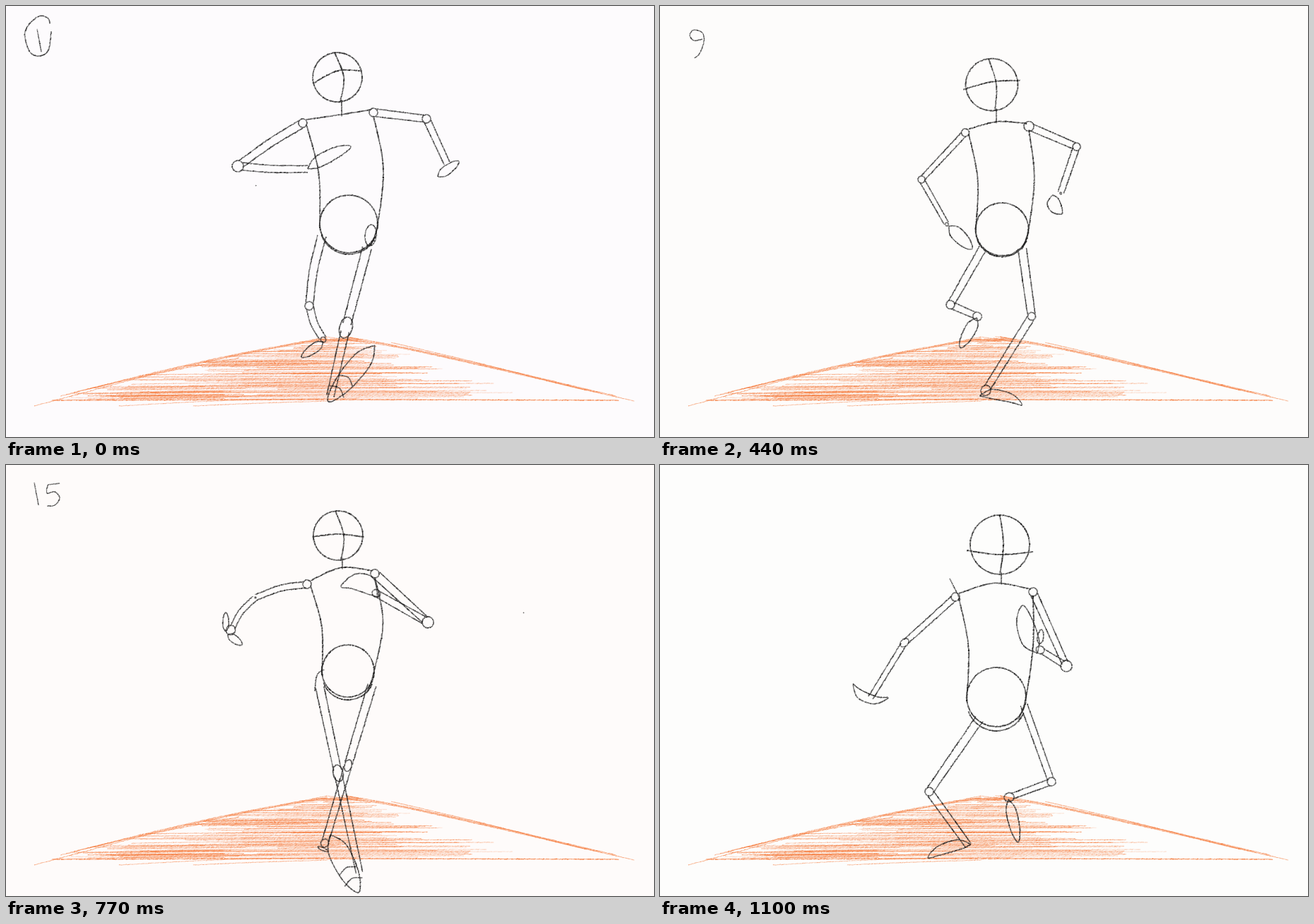
Write an HTML page with a canvas that moves like this. It is 917 by 611 pixels and loops after 1.21 s.

```html
<!DOCTYPE html>
<html lang="en">
<head>
<meta charset="utf-8">
<title>Pencil run cycle</title>
<style>
html, body { margin: 0; width: 100%; height: 100%; overflow: hidden; background: #fdfcfc; }
canvas { display: block; }
</style>
</head>
<body>
<canvas id="stage" width="917" height="611"></canvas>
<script>
const STEP = 110, W = 917, H = 611, SAMPLES = 40;
const ctx = document.getElementById('stage').getContext('2d');
const mix = (a, b, k) => a + (b - a) * k;

function seeded(seed) {
  return () => {
    seed = (seed + 0x6d2b79f5) | 0;
    let t = Math.imul(seed ^ (seed >>> 15), 1 | seed);
    t = (t + Math.imul(t ^ (t >>> 7), 61 | t)) ^ t;
    return ((t ^ (t >>> 14)) >>> 0) / 4294967296;
  };
}

// ---- curves ----

function arc(x, y, rx, ry = rx, turn = 0, from = 0, to = Math.PI * 2) {
  return Array.from({ length: SAMPLES + 1 }, (_, i) => {
    const a = mix(from, to, i / SAMPLES), u = Math.cos(a) * rx, v = Math.sin(a) * ry;
    return [x + u * Math.cos(turn) - v * Math.sin(turn), y + u * Math.sin(turn) + v * Math.cos(turn)];
  });
}

// Smooth line through x, y pairs.
function curve(...flat) {
  const n = flat.length / 2;
  const at = (i, axis) => flat[Math.min(n - 1, Math.max(0, i)) * 2 + axis];
  const spline = (i, f, axis) => {
    const [a, b, c, d] = [i - 1, i, i + 1, i + 2].map(j => at(j, axis));
    return b + f / 2 * (c - a + f * (2 * a - 5 * b + 4 * c - d + f * (3 * (b - c) + d - a)));
  };
  return Array.from({ length: SAMPLES + 1 }, (_, s) => {
    const u = s / SAMPLES * (n - 1), i = Math.min(n - 2, Math.floor(u));
    return [spline(i, u - i, 0), spline(i, u - i, 1)];
  });
}

// Point at share k of the way between two ends, moved sideways by d.
function beside(x0, y0, x1, y1, k, d) {
  const len = Math.hypot(x1 - x0, y1 - y0) || 1;
  return [mix(x0, x1, k) - (y1 - y0) / len * d, mix(y0, y1, k) + (x1 - x0) / len * d];
}

// Grainy line: short pieces with uneven pressure.
function scribble(g, pts, rand, width, alpha) {
  for (let i = 1; i < pts.length; i++) {
    const [x0, y0] = pts[i - 1], [x1, y1] = pts[i];
    const n = Math.max(1, Math.round(Math.hypot(x1 - x0, y1 - y0) / 2));
    for (let j = 0; j < n; j++) {
      const off = (rand() - .5) * .5;
      g.globalAlpha = alpha * (.55 + rand() * .45);
      g.lineWidth = width * (.75 + rand() * .5);
      g.beginPath();
      g.moveTo(mix(x0, x1, j / n) + off, mix(y0, y1, j / n) + off);
      g.lineTo(mix(x0, x1, (j + 1) / n) + off, mix(y0, y1, (j + 1) / n) + off);
      g.stroke();
    }
  }
  g.globalAlpha = 1;
}

// ---- poses ----
// head:  x, y, radius, lean and bend of the centre line, level, tilt, bow and reach of the eye line
// torso: pelvis x, y, radius, shoulder bow, right bulge, seat gap, inset of the left side
// limb:  root, middle and end points, half width, ring sizes at the three joints, bow
// tip (hand or foot), thumb: base, end, half width, sideways curl

const lift = {
  paper: '#fdfbfd', sole: 'footR',
  head: [469, 101, 35, 4, 9, 0, 9, 9, 1], torso: [485, 309, 41, 0, 11, 2, 5],
  armL: [420, 166, 328, 227, 427, 231, 6, 6, 8, 0, 2], handL: [427, 231, 488, 199, 8, -2],
  armR: [520, 151, 595, 160, 624, 223, 5.5, 6, 6, 0], handR: [611, 242, 641, 220, 6, 0],
  legL: [447, 326, 429, 425, 449, 473, 6, 0, 6, 4, 3], footL: [449, 476, 418, 498, 6, 0],
  legR: [511, 343, 481, 456, 459, 553, 6.5, 0, 9, 0], footR: [522, 481, 456, 561, 13, 0],
  extra: () => [arc(516, 325, 8, 15, .1), curve(353, 254, 354, 255),
    curve(62, 25, 59, 17, 45, 15, 27, 36, 33, 64, 47, 71, 60, 63, 64, 36)]
};
const turn = {
  paper: '#fefbfa',
  head: [469, 101, 35, 4, 9, 0, 9, 12, 1], torso: [490, 297, 38, 0, 9, 5, 27],
  armL: [423, 163, 354, 242, 446, 208, 5, 6, 7, 6], handL: [445, 210, 438, 147, 12, -7],
  armR: [518, 152, 581, 153, 590, 221, 5, 6, 6, 0], handR: [570, 230, 616, 221, 6, 0],
  legL: [462, 327, 408, 445, 447, 472, 5, 0, 6, 4], footL: [447, 474, 420, 500, 7, 0],
  legR: [517, 324, 558, 423, 461, 544, 5.5, 0, 6, 8], footR: [449, 548, 511, 563, 8, -7]
};
const drop = {
  paper: '#fdfdfd',
  head: [472, 133, 37, 4, 3, 2, 4, 3, 1.18], torso: [485, 338, 37, 14, 5, 0, 5],
  armL: [436, 199, 409, 297, 445, 355, 4, 6, 6, 5], handL: [452, 360, 480, 397, 10, 0],
  armR: [527, 199, 571, 261, 570, 312, 5.5, 7, 6, 0], handR: [548, 315, 590, 318, 8, 5],
  legL: [459, 363, 428, 451, 462, 445, 5, 0, 6, 6], footL: [462, 447, 446, 491, 8, 0],
  legR: [515, 362, 569, 440, 462, 545, 6, 0, 6, 8], footR: [455, 550, 511, 564, 7, -6],
  thumb: [450, 355, 475, 351, 3, 0]
};
const rise = {
  paper: '#fcfbfc',
  head: [467, 90, 37, 5, 10, -1, 9, 6, 1], torso: [483, 295, 38, 0, 11, 3, 5],
  armL: [428, 160, 331, 195, 367, 264, 4.5, 5, 4, 0, 6], handL: [366, 263, 403, 292, 7, 0],
  armR: [517, 142, 608, 138, 564, 219, 5, 7, 5, 3, 0], handR: [563, 221, 547, 272, 9, 2],
  legL: [455, 323, 394, 396, 436, 435, 6, 0, 6, 7], footL: [435, 437, 404, 478, 7, 0],
  legR: [510, 326, 483, 440, 460, 545, 6, 0, 5, 7], footR: [450, 555, 514, 567, 6, -6]
};
const cross = {
  paper: '#fefbfa', sole: 'footL',
  head: [470, 100, 35, 4, 8, 2, 0, 4, 1.05], torso: [484, 292, 37, 12, 12, 4, 5],
  armL: [426, 169, 353, 188, 318, 234, 4.5, 6, 1, 7, 4], handL: [314, 240, 334, 255, 5, 0],
  armR: [522, 154, 597, 223, 524, 182, 6, 6, 8, 6, 0], handR: [526, 187, 474, 172, 12, 12],
  legL: [444, 315, 470, 437, 500, 578, 6, 0, 7, 0], footL: [459, 524, 499, 606, 14, 0],
  legR: [518, 312, 484, 426, 451, 536, 6, 0, 5, 6], footR: [441, 541, 456, 548, 2, 0],
  thumb: [311, 236, 311, 209, 4, 0],
  extra: () => [curve(732, 209, 733, 210), curve(450, 290, 440, 298, 437, 321)]
};
const land = {
  paper: '#fdfcfb',
  head: [470, 117, 37, -1, 5, 9, 0, -5, 1.4], torso: [480, 334, 36, 4, 8, 0, 5],
  armL: [423, 172, 337, 238, 292, 299, 6, 6, 6, 0], handL: [268, 285, 316, 309, 7, 13],
  armR: [523, 174, 592, 285, 532, 250, 5, 5, 5, 6], handR: [528, 247, 473, 217, 21, 3],
  legL: [461, 368, 381, 449, 431, 529, 6, 0, 7, 6], footL: [434, 532, 381, 555, 7, 4],
  legR: [515, 343, 549, 452, 494, 470, 4.5, 0, 5, 6], footR: [493, 468, 506, 533, 6, 0],
  thumb: [528, 236, 528, 214, 3, 0],
  extra: () => [curve(668, 80, 669, 80), curve(519, 151, 523, 168)]
};
const reach = {
  paper: '#fdfdfc',
  head: [481, 113, 42, 0, 5, 9, -1, -5, 1.12], torso: [476, 329, 42, 12, 5, 6, 5],
  armL: [418, 187, 346, 252, 298, 330, 4.5, 6, 5, 0], handL: [273, 310, 323, 330, 6, 10],
  armR: [528, 180, 575, 285, 538, 262, 5, 6, 8, 6], handR: [534, 267, 513, 199, 12, -4],
  legL: [452, 360, 381, 463, 436, 539, 6, 0, 6, 0], footL: [440, 538, 379, 557, 7, 5],
  legR: [515, 340, 554, 449, 494, 471, 5, 0, 6, 7], footR: [493, 474, 507, 535, 7, 0],
  thumb: [537, 254, 540, 233, 4, 0],
  extra: () => [curve(410, 161, 425, 191)]
};

// The pose halfway between two others.
function between(a, b) {
  const mid = { paper: '#fdfcfb' };
  for (const key of Object.keys(a)) {
    if (Array.isArray(a[key]) && b[key] && key !== 'thumb') {
      mid[key] = a[key].slice(0, b[key].length).map((v, i) => mix(v, b[key][i], .5));
    }
  }
  return mid;
}

const cycle = [lift, turn, between(turn, drop), drop, between(drop, rise), rise,
  between(rise, cross), cross, between(cross, land), land, reach];

// ---- figure ----

function headLines([x, y, r, lean, bend, level, tilt, bow, span]) {
  return [
    arc(x, y, r),
    curve(x - lean, y - r, x + bend, y, x + lean, y + r),
    curve(x - r * span, y + level + tilt, x, y + level - bow, x + r * span, y + level - tilt)
  ];
}

function torsoLines({ head, torso, armL, armR }) {
  const [px, py, r, bow, bulge, seat, inset] = torso;
  const lx = armL[0], ly = armL[1], rx = armR[0], ry = armR[1];
  const neckX = head[0] + head[3] + 2, neckY = (ly + ry) / 2 - 4 - bow;
  return [
    arc(px, py, r),
    arc(px, py + seat, r, r, 0, .4, 2.8),
    curve(neckX, head[1] + head[2] - 3, neckX, neckY + 2),
    curve(lx + 5, ly - 5, (lx + rx) / 2, neckY, rx - 3, ry - 4),
    curve(lx + inset, ly + 2, (lx + inset + px - r) / 2 + 8, (ly + py) / 2, px - r, py + 6),
    curve(rx, ry + 5, mix(rx, px + r, .5) + bulge, mix(ry, py, .5), px + r, py, px + r * .75, py + r * .75)
  ];
}

// Two edges of a bone, kept clear of the joint rings.
function bone(x0, y0, x1, y1, w0, w1, gap0, gap1, bow) {
  const len = Math.hypot(x1 - x0, y1 - y0);
  const k0 = gap0 * .6 / len, k1 = 1 - gap1 * .6 / len;
  return [-1, 1].map(side => curve(
    ...beside(x0, y0, x1, y1, k0, side * w0),
    ...beside(x0, y0, x1, y1, .5, side * (w0 + w1) / 2 + bow),
    ...beside(x0, y0, x1, y1, k1, side * w1)));
}

function limbLines([x0, y0, x1, y1, x2, y2, w, r0, r1, r2, bow = 0]) {
  const a = Math.atan2(y1 - y0, x1 - x0), b = Math.atan2(y2 - y1, x2 - x1);
  // A straight joint is seen from the front and looks longer.
  const long = 1 + 7 * Math.max(0, Math.cos(a - b) - .9);
  return [
    ...bone(x0, y0, x1, y1, w, w * .9, r0, r1, bow),
    ...bone(x1, y1, x2, y2, w * .9, w * .8, r1, r2, bow),
    arc(x0, y0, r0), arc(x1, y1, r1 * long, r1, a), arc(x2, y2, r2, r2 * .9, b)
  ];
}

function leaf([x0, y0, x1, y1, w, curl]) {
  const side = (k, d) => beside(x0, y0, x1, y1, k, d + curl);
  return curve(x0, y0, ...side(.25, w), ...side(.72, w * .9), x1, y1,
    ...side(.72, -w * .9), ...side(.25, -w), x0, y0);
}

function soleBands([x0, y0, x1, y1, w]) {
  const at = (k, d) => beside(x0, y0, x1, y1, k, d);
  return [.63, .82].map(k => curve(...at(k, -w), ...at(k - .06, 0), ...at(k, w)));
}

const glyphs = {
  1: [[0, 0, 6, 32]],
  3: [[0, 2, 10, 0, 18, 5, 7, 12, 18, 18, 14, 26, 0, 24]],
  5: [[18, 1, 1, 3], [1, 3, 0, 15, 11, 13, 18, 22, 11, 32, 0, 33]],
  7: [[0, 0, 29, 3], [29, 3, 12, 36]],
  9: [[20, 14, 8, 16, 2, 8, 8, 1, 20, 5, 22, 18, 16, 34, 9, 41]]
};

// Odd numbers count the drawings; the last one has none.
function label(index) {
  if (index === cycle.length - 1) return [];
  const x = index ? 40 : 44, y = index < 6 ? 33 : 25;
  return [...String(index * 2 + 1)].flatMap((d, i) => glyphs[d].map(flat =>
    curve(...flat.map((v, j) => j % 2 ? y + v : x + i * (d === '1' ? 9 : 18) + v))));
}

// ---- ground ----

function makeMound() {
  const layer = document.createElement('canvas');
  layer.width = W;
  layer.height = H;
  const g = layer.getContext('2d'), rand = seeded(41);
  const line = (width, alpha, ...flat) => scribble(g, curve(...flat), rand, width, alpha);
  const left = y => 480 - 418 * ((y - 468) / 89) ** .8;
  const right = y => 480 + 408 * ((y - 468) / 91) ** .91;
  g.strokeStyle = '#f4702c';

  for (let i = 0; i < 90; i++) {
    const y = 473 + 86 * (i + rand() * 1.6) / 92;
    const a = left(y), b = right(y);
    const x0 = mix(a, b, rand() ** 2 * .4);
    const x1 = mix(x0, b, .3 + rand() * .5);
    const tilt = 1 - rand() * 4;
    line(1, .2 + rand() * .6, x0, y, mix(x0, x1, .5), y + tilt * .7, x1, y + tilt);
  }
  for (let i = 0; i < 12; i++) {
    const y = 540 + rand() * 18, x = 105 + rand() * 90;
    line(1.1, .65, x, y, x + 70 + rand() * 130, y - 3 + rand() * 2);
  }
  for (let i = 0; i < 8; i++) {
    const x = 440 + rand() * 45;
    line(1, .6, x, 473 - rand() * 5, x + 25 + rand() * 25, 471 + rand() * 6);
  }
  // Outlines are a few loose passes along each slope.
  for (let i = 0; i < 3; i++) {
    const top = 469 + i * 2, low = 553 - i * 5;
    line(1, .7, left(low), low, left(520), 520 + i, left(495), 495 + i, left(476), 476 + i, 455, top);
    line(1, .75, 482, top, right(482), 482 + i, right(510), 510 + i, right(low), low + i);
  }
  line(1, .75, 40, 567, 115, 547, 210, 522, 330, 499);
  line(1, .75, 545, 477, 660, 504, 790, 537, 889, 560);
  line(1.3, .95, 65, 559, 460, 558, 867, 559);
  line(1, .6, 160, 567, 320, 559, 500, 556);
  line(1, .6, 265, 567, 360, 563, 455, 560);
  return layer;
}

const mound = makeMound();

function draw(index) {
  const pose = cycle[index], rand = seeded(index + 7);
  const ink = (lines, width = 1.6, alpha = .95) => lines.forEach(pts => scribble(ctx, pts, rand, width, alpha));
  ctx.fillStyle = pose.paper;
  ctx.fillRect(0, 0, W, H);
  ctx.drawImage(mound, 0, 0);
  ctx.strokeStyle = '#1c1c1c';
  ink(label(index), 1.4);
  ink(headLines(pose.head), 1.8, 1);
  ink(torsoLines(pose), 1.8, 1);
  for (const side of 'LR') {
    ink(limbLines(pose['arm' + side]));
    ink(limbLines(pose['leg' + side]));
    ink([leaf(pose['hand' + side]), leaf(pose['foot' + side])]);
  }
  if (pose.thumb) ink([leaf(pose.thumb)]);
  if (pose.sole) ink(soleBands(pose[pose.sole]));
  if (pose.extra) ink(pose.extra(), 1.5);
}

const start = performance.now();
let shown = -1;
function tick() {
  const index = Math.floor((performance.now() - start) / STEP) % cycle.length;
  if (index !== shown) draw(shown = index);
  requestAnimationFrame(tick);
}
tick();
</script>
</body>
</html>
```
